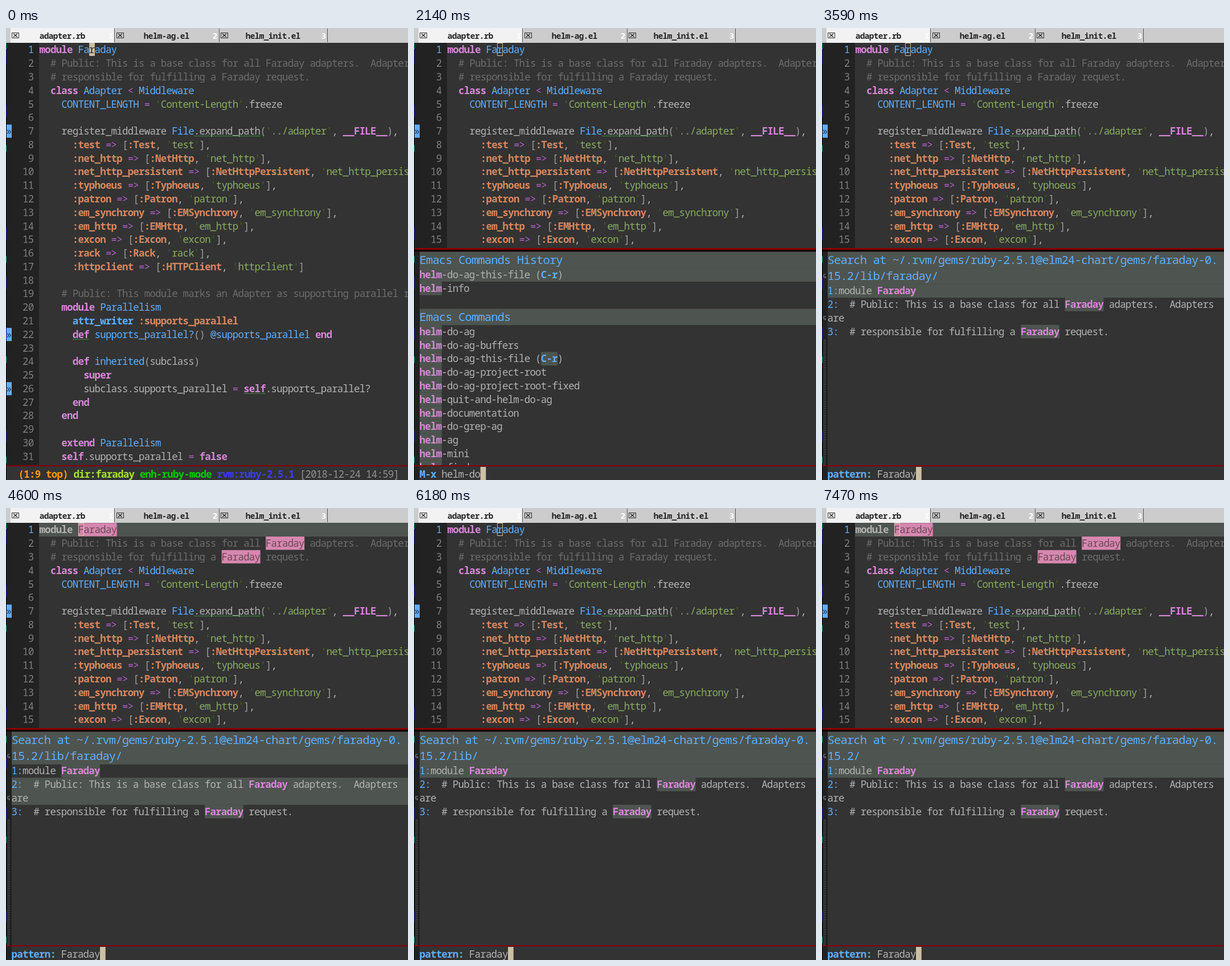
An HTML page with a canvas that plays this animation: 706 px wide and 793 px high, repeating every 8000 ms.

```html
<!DOCTYPE html>
<html lang="en">
<head>
<meta charset="utf-8">
<title>Editor search</title>
<style>
  html, body { margin: 0; width: 100%; height: 100%; overflow: hidden; background: #333; }
  canvas { display: block; }
</style>
</head>
<body>
<canvas id="stage" width="706" height="793"></canvas>
<script>
const ctx = document.getElementById('stage').getContext('2d');
const W = 706, H = 793, LOOP = 8000;
const CELL = 9.69, ROW = 23.8, HEAD_CELL = 11.42, HEAD_ROW = 28.2;
const CODE_X = 59, LEFT = 10, SPLIT = 386, ECHO = 768;
const C = {
  bg: '#333333', gutter: '#222222', text: '#b2b2b2', dim: '#6c6c6c', num: '#7f7f7f',
  key: '#d787d7', blue: '#5fafff', orange: '#d7875f', green: '#87ad5f', quote: '#48642f',
  op: '#b45fd0', punct: '#9c9c9c', sel: '#4e544f', match: '#d787af', cursor: '#cdbfa3',
  red: '#8b0000', wave: '#3f9a3f', ink: '#262626'
};

const code = `module Faraday
  # Public: This is a base class for all Faraday adapters.  Adapters are
  # responsible for fulfilling a Faraday request.
  class Adapter < Middleware
    CONTENT_LENGTH = 'Content-Length'.freeze

    register_middleware File.expand_path('../adapter', __FILE__),
      :test => [:Test, 'test'],
      :net_http => [:NetHttp, 'net_http'],
      :net_http_persistent => [:NetHttpPersistent, 'net_http_persistent'],
      :typhoeus => [:Typhoeus, 'typhoeus'],
      :patron => [:Patron, 'patron'],
      :em_synchrony => [:EMSynchrony, 'em_synchrony'],
      :em_http => [:EMHttp, 'em_http'],
      :excon => [:Excon, 'excon'],
      :rack => [:Rack, 'rack'],
      :httpclient => [:HTTPClient, 'httpclient']

    # Public: This module marks an Adapter as supporting parallel requests.
    module Parallelism
      attr_writer :supports_parallel
      def supports_parallel?() @supports_parallel end

      def inherited(subclass)
        super
        subclass.supports_parallel = self.supports_parallel?
      end
    end

    extend Parallelism
    self.supports_parallel = false`.split('\n');

const warnings = { 7: '.expand_path', 22: 'def', 26: 'self' };

const history = ['helm-do-ag-this-file (C-r)', 'org-mode', 'enh-ruby-mode', 'yaml-mode',
  'git-timemachine', 'yari', 'ruby-mode', 'format-buffer (C-c C-c)', 'sh-mode', 'flycheck-mode',
  'auto-complete-mode', 'json-pretty-print-buffer', 'bc3-autosave-file', 'helm-info', 'ibuffer'];

const commands = ['helm-do-ag', 'helm-do-ag-buffers', 'helm-do-ag-this-file (C-r)',
  'helm-do-ag-project-root', 'helm-do-ag-project-root-fixed', 'helm-quit-and-helm-do-ag',
  'helm-documentation', 'helm-do-grep-ag', 'helm-ag', 'helm-mini', 'helm-find', 'helm-apropos'];

const hits = ['1:module Faraday',
  '2:  # Public: This is a base class for all Faraday adapters.  Adapters are',
  '3:  # responsible for fulfilling a Faraday request.'];

// Timeline: each entry changes part of the state.
const steps = [
  [0, { mode: 'edit', typed: '', query: '', sel: 1, mark: 0, dir: '', home: false, found: true }],
  [1330, { mode: 'mx' }]
];
const at = (time, patch) => steps.push([time, patch]);
const cmd = 'helm-do-ag';
function typeKeys(start, gap, plan) {
  plan.forEach(([n, filtered], i) =>
    at(start + i * gap, { typed: cmd.slice(0, n), query: cmd.slice(0, filtered) }));
}
typeKeys(1570, 66, [[1, 0], [2, 0], [2, 2], [3, 2], [4, 2], [4, 4], [5, 4], [6, 4], [7, 4], [7, 6], [7, 7]]);
typeKeys(2370, 58, [[8, 7], [8, 8], [9, 8], [10, 8], [10, 9], [10, 10]]);
at(3300, { home: true });
function openDir(time, dir) {
  at(time, { mode: 'ag', dir, home: false, found: false, sel: 1, mark: 0 });
  at(time + 40, { found: true });
}
openDir(3540, 'lib/faraday/');
at(4040, { mark: 1 });
[[4600, 2], [4760, 3], [5100, 2], [5260, 1]].forEach(([time, n]) => {
  at(time, { sel: n });
  at(time + 40, { mark: n });
});
at(5850, { home: true });
openDir(6140, 'lib/');
at(6640, { mark: 1 });
at(6710, { home: true });
openDir(6970, '');
at(7470, { mark: 1 });

function rect(x, y, w, h, color) {
  ctx.fillStyle = color;
  ctx.fillRect(x, y, w, h);
}

// Text on a fixed grid; cy is the middle of the row. Returns the x after it.
function text(str, x, cy, color, bold, cell = CELL) {
  const size = cell * 1.8;
  ctx.font = `${bold ? 'bold ' : ''}${size}px "Noto Sans Mono", "DejaVu Sans Mono", monospace`;
  ctx.fillStyle = color;
  ctx.textAlign = 'center';
  for (const ch of str) {
    if (ch !== ' ') ctx.fillText(ch, x + cell / 2, cy + size * 0.35);
    x += cell;
  }
  return x;
}

function hollow(x, y) {
  ctx.strokeStyle = C.cursor;
  ctx.lineWidth = 1;
  ctx.strokeRect(Math.round(x) + 0.5, Math.round(y) + 0.5, 9, 22);
}

function clipTo(y, h, draw) {
  ctx.save();
  ctx.beginPath();
  ctx.rect(0, y, W, h);
  ctx.clip();
  draw();
  ctx.restore();
}

const token = /#.*|'[^']*'|:\w+|@?\w+\??|=>|[=<]|[^\w\s]|\s+/g;
const keywords = /^(module|class|def|end|super|extend|self|false|__FILE__)$/;

function codeLine(line, x, cy) {
  let prev = '';
  for (const part of line.match(token) || []) {
    if (part[0] === "'") {
      x = text("'", x, cy, C.quote);
      x = text(part.slice(1, -1), x, cy, C.green);
      x = text("'", x, cy, C.quote);
    } else {
      let color = C.text, bold = false;
      if (part[0] === '#') color = C.dim;
      else if (/^:\w/.test(part)) { color = C.orange; bold = true; }
      else if (keywords.test(part)) { color = C.key; bold = true; }
      else if (part === 'attr_writer') { color = C.blue; bold = true; }
      else if (/^[A-Z@]/.test(part) || prev === 'def') color = C.blue;
      else if (/^[=<]/.test(part)) color = C.op;
      else if (/^[()[\]]/.test(part)) color = C.punct;
      x = text(part, x, cy, color, bold);
    }
    if (part.trim()) prev = part;
  }
}

function wave(x, y, w) {
  ctx.strokeStyle = C.wave;
  ctx.lineWidth = 1;
  ctx.beginPath();
  for (let i = 0; i <= w; i += 2) ctx.lineTo(x + i, y + (i / 2 % 2));
  ctx.stroke();
}

function flag(cy) {
  rect(0, cy - 11.5, 10, 23, C.blue);
  text('»', 0.3, cy, '#1d3b5c');
}

function editor(s) {
  rect(LEFT, 26, 48, ECHO, C.gutter);
  const current = s.mark || 1;
  code.forEach((line, i) => {
    const n = i + 1, cy = 38.3 + i * 23.78, top = cy - 12;
    const lit = s.mark === n;
    if (lit) rect(58, top, W - 58, ROW, C.sel);
    text(String(n).padStart(2), LEFT + 2 * CELL, cy, n === current ? C.blue : C.num);
    if (lit) text(line, CODE_X, cy, C.text, n === 1);
    else codeLine(line, CODE_X, cy);
    if (warnings[n]) {
      const word = warnings[n];
      wave(CODE_X + line.indexOf(word) * CELL, cy + 8, word.length * CELL);
      flag(cy);
    }
    if (s.mark && n < 4) {
      const x = CODE_X + line.indexOf('Faraday') * CELL;
      rect(x, top, 7 * CELL, ROW - 0.5, C.match);
      text('Faraday', x, cy, '#6a4a58');
      if (lit) hollow(x, top);
    }
  });
  if (s.mark) return;
  const x = CODE_X + 9 * CELL;
  if (s.mode === 'edit') {
    rect(x, 26, CELL, 23, C.cursor);
    text('r', x, 38.3, C.ink);
  } else hollow(x, 26);
}

function tabs() {
  rect(0, 0, W, 26, '#cccccc');
  rect(8, 0, 182, 26, '#f2f2f2');
  [['adapter.rb', 8, 59, 180], ['helm-ag.el', 192, 242, 363], ['helm_init.el', 375, 421, 554]]
    .forEach(([name, x, nameX, numX], i) => {
      text(name, nameX, 13.5, '#222222', true, 8);
      text(String(i + 1), numX, 13.5, '#ffffff', true, 8);
      ctx.strokeStyle = '#333333';
      ctx.lineWidth = 1;
      ctx.strokeRect(x + 2.5, 8.5, 12, 9);
      ctx.beginPath();
      ctx.moveTo(x + 5, 10); ctx.lineTo(x + 12, 16);
      ctx.moveTo(x + 12, 10); ctx.lineTo(x + 5, 16);
      ctx.lineWidth = 1.6;
      ctx.stroke();
    });
  [190, 374, 564].forEach(x => rect(x, 1, 1, 24, '#555555'));
}

function heading(str, y) {
  rect(LEFT, y, W, HEAD_ROW + 0.4, C.sel);
  text(str, LEFT, y + HEAD_ROW / 2, C.blue, false, HEAD_CELL);
  return y + HEAD_ROW;
}

function marked(str, word, x, cy, color = C.text) {
  const i = word ? str.indexOf(word) : -1;
  if (i < 0) return text(str, x, cy, color);
  x = text(str.slice(0, i), x, cy, color);
  rect(x, cy - 12, word.length * CELL, ROW, C.sel);
  x = text(word, x, cy, C.key, true);
  return text(str.slice(i + word.length), x, cy, color);
}

function command(str, query, y, selected) {
  const cy = y + ROW / 2;
  if (selected) rect(LEFT, y, W, ROW, C.sel);
  const [, name, keys] = str.match(/^([^(]*)(?:\((.*)\))?$/);
  let x = marked(name, query, LEFT, cy);
  if (keys) {
    x = text('(', x, cy, C.text);
    rect(x, y, keys.length * CELL, ROW, C.sel);
    x = text(keys, x, cy, C.blue, true);
    text(')', x, cy, C.text);
  }
  return y + ROW;
}

function commandList(s) {
  const fits = name => name.includes(s.query);
  let y = heading('Emacs Commands History', 393);
  history.filter(fits).forEach((name, i) => { y = command(name, s.query, y, i === 0); });
  if (s.query) {
    y = heading('Emacs Commands', y + ROW);
    commands.filter(fits).forEach(name => { y = command(name, s.query, y); });
  }
  return y;
}

function wrapMark(cy) {
  ctx.strokeStyle = '#8a8a8a';
  ctx.lineWidth = 1;
  ctx.beginPath();
  ctx.moveTo(7, cy - 3);
  ctx.lineTo(3, cy - 3);
  ctx.lineTo(3, cy + 2);
  ctx.lineTo(7, cy + 2);
  ctx.moveTo(5, cy);
  ctx.lineTo(7, cy + 2);
  ctx.lineTo(5, cy + 4);
  ctx.stroke();
}

function searchList(s) {
  let y = heading('Search at ~/.rvm/gems/ruby-2.5.1@elm24-chart/gems/faraday-0.', 393);
  wrapMark(y + HEAD_ROW / 2);
  y = heading('15.2/' + s.dir, y);
  if (!s.found) return y;
  hits.forEach((hit, i) => {
    const long = hit.length > 71, cy = y + ROW / 2, h = long ? 2 * ROW : ROW;
    if (s.sel === i + 1) rect(LEFT, y, W, h, C.sel);
    const x = text(hit.slice(0, 2), LEFT, cy, C.blue);
    marked(long ? hit.slice(2, -4) : hit.slice(2), 'Faraday', x, cy);
    if (long) {
      text('are', LEFT, cy + ROW, C.text);
      wrapMark(cy + ROW);
    }
    y += h;
  });
  return y;
}

function panel(s) {
  rect(0, SPLIT + 3, W, ECHO, C.bg);
  rect(0, SPLIT + 3, LEFT, ECHO, C.gutter);
  const end = s.mode === 'mx' ? commandList(s) : searchList(s);
  for (let y = end + 2; y < ECHO - 1; y += 3) {
    rect(3, Math.round(y), 1, 1, '#8a8a8a');
    rect(5, Math.round(y), 1, 1, '#8a8a8a');
  }
  rect(0, SPLIT + 3, W, 3, '#000000');
  rect(0, SPLIT, W, 3, C.red);
}

function echo(s) {
  const cy = 782.5;
  rect(0, ECHO, W, 30, C.bg);
  if (s.mode === 'edit') {
    let x = 22;
    [['(1:9 top)', '#ff9900', 1], ['dir:faraday', '#a5e22e', 1], ['enh-ruby-mode', '#00cd00', 1],
      ['rvm:ruby-2.5.1', '#3b3bff', 1], ['[2018-12-24 14:59]', '#909090', 0]]
      .forEach(([str, color, bold]) => { x = text(str, x, cy, color, bold) + CELL; });
  } else {
    rect(0, ECHO, LEFT, 30, C.gutter);
    const prompt = s.mode === 'mx' ? 'M-x' : 'pattern:';
    let x = text(prompt, LEFT, cy, C.blue, true) + CELL;
    x = text(s.mode === 'mx' ? s.typed : 'Faraday', x, cy, C.text);
    rect(s.home ? LEFT : x, 770, CELL, 23, C.cursor);
    if (s.home) text(prompt[0], LEFT, cy, C.ink, true);
  }
  rect(0, ECHO - 1, W, 2, C.red);
}

function edge() {
  rect(0, 26, 1, H, '#000000');
  [40, 135, 350, 436, 525, 705].forEach(y => rect(0, y, 1, 22, '#10107a'));
  [26, 205, 400, 576, 752].forEach(y => rect(0, y, 1, 12, '#1f8c80'));
}

function draw(s) {
  rect(0, 0, W, H, C.bg);
  rect(0, 26, LEFT, H, C.gutter);
  const split = s.mode !== 'edit';
  clipTo(26, (split ? SPLIT : ECHO) - 26, () => editor(s));
  tabs();
  if (split) clipTo(SPLIT, ECHO - SPLIT, () => panel(s));
  echo(s);
  edge();
}

let shown = -1;
const began = performance.now();
function tick() {
  const t = (performance.now() - began) % LOOP;
  const count = steps.filter(([time]) => time <= t).length;
  if (count !== shown) {
    shown = count;
    draw(Object.assign({}, ...steps.slice(0, count).map(([, patch]) => patch)));
  }
  requestAnimationFrame(tick);
}
tick();
</script>
</body>
</html>
```
